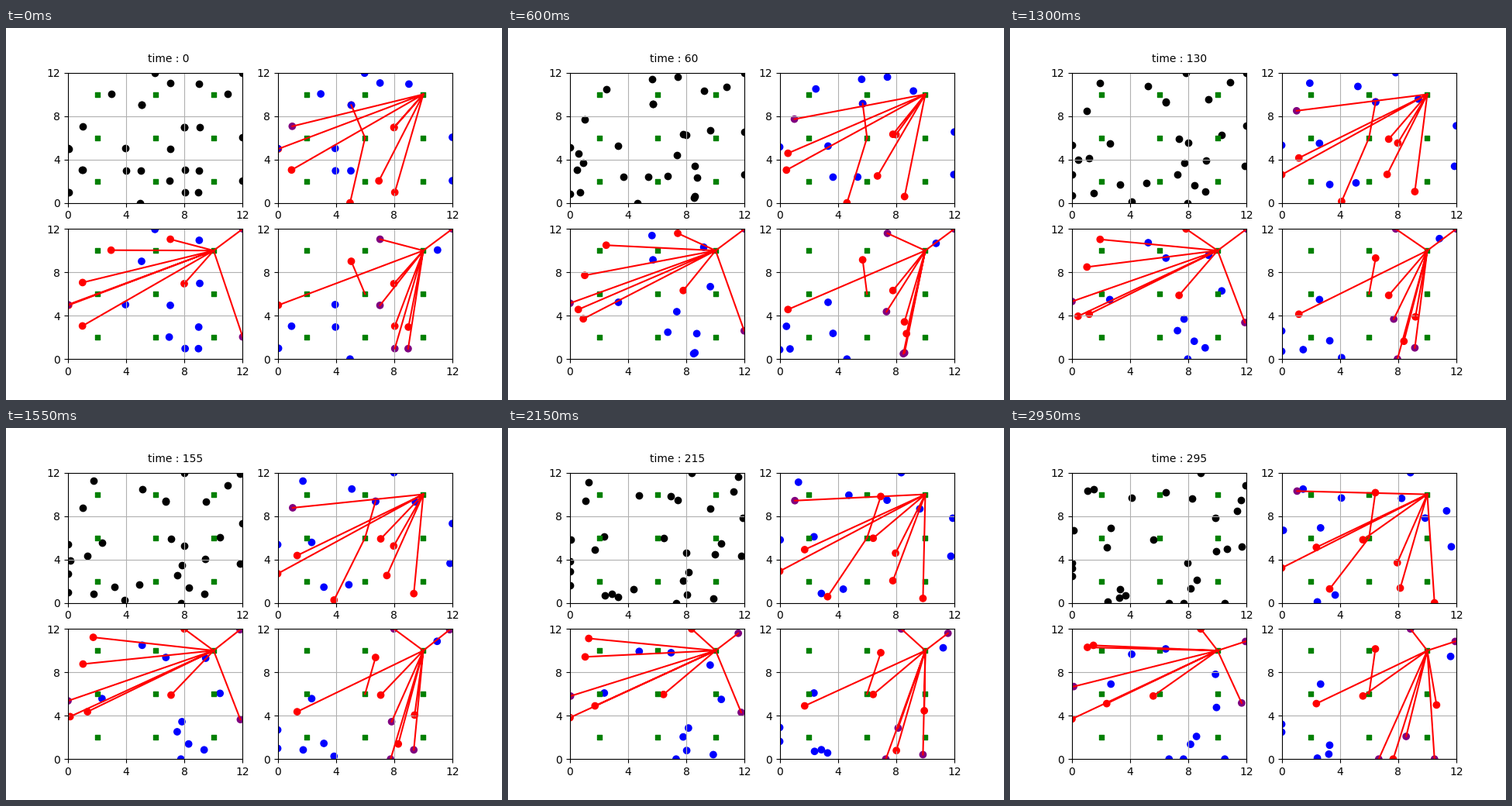
These frames come from a looping animation (640x480 px, 3000 ms). A matplotlib script:

```python
import matplotlib.pyplot as plt
import numpy as np
from matplotlib.animation import FuncAnimation

FRAMES, INTERVAL, STEP = 60, 50, 5
TICKS = FRAMES * STEP
SIZE = 12
SPEED = 0.011
COLORS = {"b": "blue", "r": "red", "p": "purple"}
CORNER, CENTER = (10, 10), (6, 6)


class Walker:
    """Walks at constant speed, turns now and then, and slides along walls.

    roles has one letter per network: b idle, r or p linked, "." not shown.
    Each turn is (tick, new heading in degrees).
    """

    def __init__(self, roles, start, heading, *turns, hub=CORNER):
        self.roles, self.hub = roles, hub
        turns = dict(turns)
        pos = np.array(start, float)
        self.path = [pos]
        for tick in range(TICKS):
            heading = turns.get(tick, heading)
            angle = np.radians(heading)
            step = SPEED * np.array([np.cos(angle), np.sin(angle)])
            pos = np.clip(pos + step, 0, SIZE)
            self.path.append(pos)


upper = [
    Walker("bb.", (6, 12), 239, (260, 165)),
    Walker("brp", (7, 11), 56),
    Walker("bb.", (9, 11), 285),
    Walker("..b", (11, 10), 111, (95, 60), (122, -65)),
    Walker(".pp", (12, 12), 45, (142, 202), (200, -47), (260, -82)),
    Walker("br.", (3, 10), 136, (185, 230), (250, -44)),
    Walker("rbr", (5, 9), 12, (185, 97), (258, 188), hub=CENTER),
    Walker("b..", (5, 9), 11),
    Walker("pr.", (1, 7), 89),
    Walker("rrr", (8, 7), 252, (110, 175), (260, 204)),
    Walker("r..", (8, 7), 269),
    Walker(".b.", (9, 7), 333, (125, 304), (185, 238)),
    Walker("b..", (12, 6), 48, (205, 130)),
]

lower = [
    Walker("rrr", (0, 5), 323, (133, 55), (260, -20)),
    Walker("bp.", (0, 5), 168, (185, 85)),
    Walker("bbb", (4, 5), 161, (175, 69)),
    Walker(".bp", (7, 5), 298),
    Walker("r.b", (1, 3), 147, (40, 233), (120, 160)),
    Walker(".r.", (1, 3), 97, (93, 188)),
    Walker("b.b", (4, 3), 242),
    Walker("b..", (5, 3), 300, (90, 218)),
    Walker("..r", (8, 3), 37),
    Walker(".br", (9, 3), 246),
    Walker("rb.", (7, 2), 150, (40, 69), (95, -22), (187, -90), (260, -33)),
    Walker("bp.", (12, 2), 49, (40, 97)),
    Walker("..b", (0, 1), 355, (185, -17)),
    Walker("..b", (0, 1), 191, (135, 103)),
    Walker("r.b", (5, 0), 238, (110, 152), (242, 70), hub=CENTER),
    Walker("rbp", (8, 1), 324, (70, 43), (135, 318)),
    Walker(".bp", (9, 1), 225),
]

walkers = upper + lower


class Panel:
    def __init__(self, ax, network=None):
        self.network = network
        if network is None:
            self.members = walkers
            colors = "black"
        else:
            self.members = [w for w in walkers if w.roles[network] != "."]
            colors = [COLORS[w.roles[network]] for w in self.members]
        self.dots = ax.scatter(*zip(*self.points(0)), c=colors)
        hubs = np.meshgrid([2, 6, 10], [2, 6, 10])
        ax.scatter(*hubs, c="green", marker="s", s=16)
        self.links, = ax.plot([], [], color="red")
        ticks = range(0, SIZE + 1, 4)
        ax.set(xlim=(0, SIZE), ylim=(0, SIZE), xticks=ticks, yticks=ticks)
        ax.grid()

    def points(self, tick):
        return [w.path[tick] for w in self.members]

    def draw(self, tick):
        points = self.points(tick)
        self.dots.set_offsets(points)
        if self.network is None:
            return
        lines = []
        for w, p in zip(self.members, points):
            if w.roles[self.network] in "rp":
                lines += [w.hub, p, (np.nan, np.nan)]
        self.links.set_data(*zip(*lines))


fig, axes = plt.subplots(2, 2, figsize=(6.4, 4.8), dpi=100)
panels = [Panel(ax, net) for ax, net in zip(axes.flat, (None, 0, 1, 2))]
clock = axes[0, 0].text(5.5, 13, "")


def update(frame):
    time = frame * STEP
    clock.set_text(f"time : {time}")
    # The walkers have already moved one step when the clock shows 0.
    for panel in panels:
        panel.draw(time + STEP)


anim = FuncAnimation(fig, update, frames=FRAMES, interval=INTERVAL,
                     repeat=True, repeat_delay=0)
plt.show()
```
